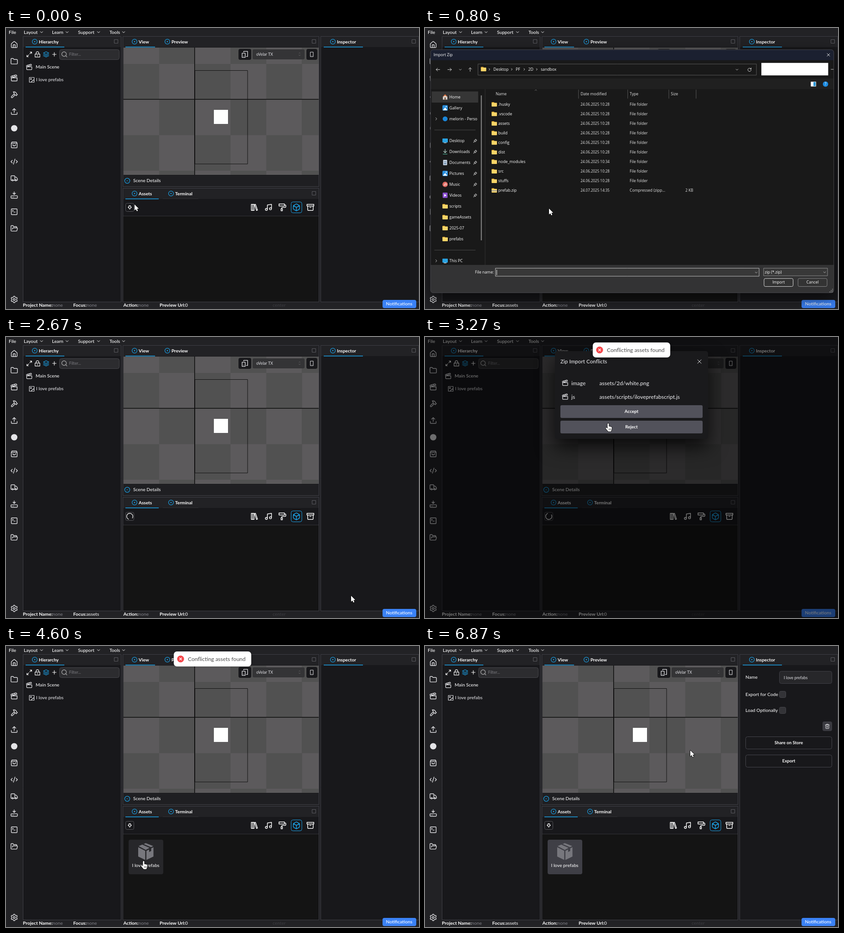
Write an HTML page with a canvas that moves like this. It is 906 px wide and 618 px high and loops after 7.34 s.

```html
<!DOCTYPE html>
<html lang="en">
<head>
<meta charset="utf-8">
<title>Zip import</title>
<style>
html, body { margin: 0; width: 100%; height: 100%; overflow: hidden; background: #18181b; }
canvas { display: block; }
</style>
</head>
<body>
<canvas id="stage" width="906" height="618"></canvas>
<script>
const c = document.getElementById('stage').getContext('2d');
const LOOP = 7340, UI = 'Lato, sans-serif', SYS = '"Open Sans", sans-serif';
const BLUE = '#1ba1e6', LIGHT = '#e4e4e7';
let t = 0;

// Outline icons on a 24 unit grid
const ICONS = {
  home: 'M15 21v-8a1 1 0 0 0-1-1h-4a1 1 0 0 0-1 1v8M3 10a2 2 0 0 1 .7-1.5l7-6a2 2 0 0 1 2.6 0l7 6A2 2 0 0 1 21 10v9a2 2 0 0 1-2 2H5a2 2 0 0 1-2-2z',
  folder: 'M20 20a2 2 0 0 0 2-2V8a2 2 0 0 0-2-2h-7.9a2 2 0 0 1-1.7-.9L9.6 3.9A2 2 0 0 0 7.9 3H4a2 2 0 0 0-2 2v13a2 2 0 0 0 2 2z',
  clapper: 'M20.2 6 3 11l-.9-2.4c-.3-1.1.3-2.2 1.3-2.5l13.5-4c1.1-.3 2.2.3 2.5 1.3zM6.2 5.3l3.1 3.9M12.4 3.4l3.1 4M3 11h18v8a2 2 0 0 1-2 2H5a2 2 0 0 1-2-2z',
  hammer: 'm15 12-8.4 8.4a1 1 0 0 1-3-3L12 9M18 15l4-4M21.5 11.5l-1.9-1.9A2 2 0 0 1 19 8.2V7l-2.3-2.3A6 6 0 0 0 12.5 3H9l.9.8A6.2 6.2 0 0 1 12 8.4V10l2 2h1.2a2 2 0 0 1 1.4.6l1.9 1.9',
  upload: 'M12 3v12M17 8l-5-5-5 5M21 15v4a2 2 0 0 1-2 2H5a2 2 0 0 1-2-2v-4',
  bag: 'M3 7h18M5 3h14l2 4v12a2 2 0 0 1-2 2H5a2 2 0 0 1-2-2V7zM16 11a4 4 0 0 1-8 0',
  code: 'm18 16 4-4-4-4M6 8l-4 4 4 4M14.5 4l-5 16',
  truck: 'M14 18V6a2 2 0 0 0-2-2H4a2 2 0 0 0-2 2v11a1 1 0 0 0 1 1h2M15 18H9M19 18h2a1 1 0 0 0 1-1v-4l-4-5h-4M9 18a2 2 0 1 1-4 0 2 2 0 1 1 4 0M19 18a2 2 0 1 1-4 0 2 2 0 1 1 4 0',
  drive: 'M12 2v8M16 6l-4 4-4-4M4 14h16a2 2 0 0 1 2 2v4a2 2 0 0 1-2 2H4a2 2 0 0 1-2-2v-4a2 2 0 0 1 2-2M6 18h.01M10 18h.01',
  terminal: 'M7 11l2-2-2-2M11 13h4M5 3h14a2 2 0 0 1 2 2v14a2 2 0 0 1-2 2H5a2 2 0 0 1-2-2V5a2 2 0 0 1 2-2z',
  open: 'M6 14l1.5-2.9A2 2 0 0 1 9.2 10H20a2 2 0 0 1 1.9 2.5l-1.5 6a2 2 0 0 1-2 1.5H4a2 2 0 0 1-2-2V5a2 2 0 0 1 2-2h3.9l2.5 3H18a2 2 0 0 1 2 2v2',
  books: 'M3 3h8v18H3zM7 3v18M12 4l3-1 6 17-3 1z',
  music: 'M9 18V5l12-2v13M9 18a3 3 0 1 1-6 0 3 3 0 1 1 6 0M21 16a3 3 0 1 1-6 0 3 3 0 1 1 6 0',
  roller: 'M2 2h16v6H2zM10 16v-2a2 2 0 0 1 2-2h8a2 2 0 0 0 2-2V7a2 2 0 0 0-2-2h-2M8 16h4v6H8z',
  box: 'M21 8a2 2 0 0 0-1-1.7l-7-4a2 2 0 0 0-2 0l-7 4A2 2 0 0 0 3 8v8a2 2 0 0 0 1 1.7l7 4a2 2 0 0 0 2 0l7-4A2 2 0 0 0 21 16zM3.3 7l8.7 5 8.7-5M12 22V12',
  archive: 'M2 3h20v5H2zM4 8v11a2 2 0 0 0 2 2h12a2 2 0 0 0 2-2V8M10 12h4',
  arrow: 'M15 5v6h4l-7 8-7-8h4V5z',
  expand: 'M15 3h6v6M9 21H3v-6M21 3l-7 7M3 21l7-7',
  lock: 'M3 11h18v11H3zM7 11V7a5 5 0 0 1 10 0v4M12 15v3',
  layers: 'M12 2 2 7l10 5 10-5zM2 12l10 5 10-5M2 17l10 5 10-5',
  plus: 'M5 12h14M12 5v14',
  search: 'M19 11a8 8 0 1 1-16 0 8 8 0 1 1 16 0M21 21l-4.3-4.3',
  image: 'M3 3h18v18H3zM11 9a2 2 0 1 1-4 0 2 2 0 1 1 4 0M21 15l-3-3-9 9',
  devices: 'M3 8h10v14H3zM8 18v.01M8 4V2h13v17h-4',
  phone: 'M6 2h12v20H6zM12 18v.01',
  trash: 'M3 6h18M19 6v14a2 2 0 0 1-2 2H7a2 2 0 0 1-2-2V6M8 6V3h8v3M10 11v6M14 11v6',
  down: 'm5 9 7 7 7-7', right: 'm9 5 7 7-7 7', up: 'm6 15 6-6 6 6', close: 'M4 4l16 16M20 4 4 20',
  left: 'M22 12H2M10 4l-8 8 8 8', refresh: 'M20 9a9 9 0 1 0 1 5M21 3v6h-6',
  download: 'M12 2v15M5 10l7 7 7-7',
  pin: 'M14 3l7 7-3 1-4 5-1 3-8-8 3-1 5-4zM8 16l-6 6'
};
for (const k in ICONS) ICONS[k] = new Path2D(ICONS[k]);
ICONS.gear = new Path2D('M15 12a3 3 0 1 1-6 0 3 3 0 1 1 6 0');
for (let i = 0; i <= 72; i++) {
  const a = i * Math.PI / 36, r = 8.8 + 1.3 * Math.tanh(2 * Math.cos(6 * a + Math.PI));
  ICONS.gear[i ? 'lineTo' : 'moveTo'](12 + r * Math.cos(a), 12 + r * Math.sin(a));
}

const clamp = v => Math.max(0, Math.min(1, v));
const span = (a, b) => clamp((t - a) / (b - a));
const between = (a, b) => t >= a && t < b;
const smooth = p => p * p * (3 - 2 * p);
const out = p => 1 - (1 - p) ** 3;

function rect(x, y, w, h, fill, stroke, r = 0) {
  c.beginPath();
  const o = stroke ? .5 : 0;
  c.roundRect(x + o, y + o, w - 2 * o, h - 2 * o, r);
  if (fill) { c.fillStyle = fill; c.fill(); }
  if (stroke) { c.strokeStyle = stroke; c.lineWidth = 1; c.stroke(); }
}
function disc(x, y, r, fill, stroke, w = 1.2) {
  c.beginPath();
  c.arc(x, y, r, 0, 7);
  if (fill) { c.fillStyle = fill; c.fill(); }
  if (stroke) { c.strokeStyle = stroke; c.lineWidth = w; c.stroke(); }
}
function poly(fill, ...p) {
  c.beginPath();
  for (let i = 0; i < p.length; i += 2) c.lineTo(p[i], p[i + 1]);
  c.closePath();
  c.fillStyle = fill;
  c.fill();
}
function text(s, x, y, color = '#f4f4f5', size = 10.2, weight = 500, align = 'left', font = UI) {
  c.font = `${weight} ${size}px ${font}`;
  c.textAlign = align;
  c.textBaseline = 'middle';
  c.fillStyle = color;
  c.fillText(s, x, y + .5);
}
const sys = (s, x, y, color = '#fff', size = 8.8, align) => text(s, x, y + .2, color, size, 500, align, SYS);
function icon(name, x, y, size = 16, color = LIGHT, w = 2, angle = 0) {
  c.save();
  c.translate(x, y);
  c.rotate(angle);
  c.scale(size / 24, size / 24);
  c.translate(-12, -12);
  c.strokeStyle = color;
  c.lineWidth = w;
  c.lineCap = c.lineJoin = 'round';
  c.stroke(ICONS[name]);
  c.restore();
}
function scaled(x, y, s, alpha, draw) {
  c.save();
  c.globalAlpha = alpha;
  c.translate(x, y);
  c.scale(s, s);
  c.translate(-x, -y);
  draw();
  c.restore();
}

function tab(label, x, y, from, to) {
  disc(x, y, 5.4, null, BLUE);
  disc(x, y, 1.3, BLUE);
  text(label, x + 9, y, '#fff', 10, 700);
  if (to) rect(from, y + 11, to - from, 1.5, BLUE);
}
function panel(x, y, w, h) {
  rect(x, y, w, h, '#18181b', '#3f3f46');
  rect(x + 1, y + 1, w - 2, 23, '#222225');
  rect(x + w - 16, y + 7, 9, 9, null, '#5b5b60');
}

function drawView() {
  c.save();
  c.beginPath();
  c.rect(257, 43, 429, 280);
  c.clip();
  for (let i = 0; i < 6; i++) for (let j = -2; j < 3; j++)
    rect(257.7 + i * 78.3, 157.3 + j * 78.4, 78.8, 78.8, (i + j) % 2 ? '#515151' : '#5c5a5c');
  rect(413, 43, 1.5, 280, '#0c0c0c');
  rect(256, 156, 431, 1.5, '#0c0c0c');
  rect(414, 93, 116.5, 206.5, null, '#111');
  rect(456, 180, 31, 31, '#fff');
  c.restore();
  rect(510, 46, 28, 24, '#18181b', null, 4);
  icon('devices', 524, 58, 16);
  rect(541, 47, 114, 22, '#343436', null, 3);
  text('oVelar TX', 549, 57.5, '#d4d4d8', 8.7);
  icon('up', 644, 55, 6, '#888');
  icon('down', 644, 60, 6, '#888');
  rect(659, 46, 24, 24, '#18181b', null, 4);
  icon('phone', 671, 58, 12);
}

function drawCard() {
  rect(269, 426, 76, 76, t >= 4670 ? '#3f3f46' : '#27272a', null, 4);
  const g = '#77777d';
  poly(g, 291, 440, 299, 436.7, 315, 444, 306.5, 448.5);
  poly(g, 302, 435.4, 306.5, 433.5, 323, 440, 318, 442.5);
  poly(g, 290, 442.5, 305.5, 450.5, 305.5, 470.5, 290, 463);
  poly(g, 308, 450.5, 314, 447.4, 314, 453, 318.5, 450.8, 318.5, 445, 323.5, 442.5, 323.5, 463, 308, 470.5);
  text('I love prefabs', 306.5, 482, '#f4f4f5', 10.2, 500, 'center');
}

function drawInspector() {
  text('Name', 703, 68.5);
  rect(777, 55, 116, 28, '#27272a', '#3f3f46', 4);
  text('I love prefabs', 787, 69.5, '#d4d4d8', 8.9);
  [['Export for Code', 106], ['Load Optionally', 141]].forEach(([label, y]) => {
    text(label, 703, y);
    rect(777, y - 7, 15, 15, '#333337', '#46464b', 3);
  });
  rect(872, 166, 21, 21, between(5560, 5760) ? '#52525b' : '#3a3a40', null, 4);
  icon('trash', 882.5, 176.5, 12);
  [['Share on Store', 199], ['Export', 239]].forEach(([label, y]) => {
    const hover = y === 199 && between(5820, 6020);
    rect(703, y, 190, 28, hover ? '#27272a' : null, '#46464d', 4);
    text(label, 798, y + 14, '#fff', 9.6, 700, 'center');
  });
}

function drawApp() {
  rect(0, 0, 906, 618, '#222225');
  text('File', 6, 9, '#fff');
  [['Layout', 39, 78], ['Learn', 101, 134], ['Support', 158, 203], ['Tools', 227, 258]].forEach(([s, x, cx]) => {
    text(s, x, 9, '#fff');
    icon('down', cx, 9, 9, '#fff', 2.6);
  });
  ['home', 'folder', 'clapper', 'hammer', 'upload', '', 'bag', 'code', 'truck', 'drive', 'terminal', 'open'].forEach((k, i) => {
    const y = 36.7 + i * 36.75;
    if (k) icon(k, 18, y, 17); else disc(18, y, 7, LIGHT);
  });
  icon('gear', 18, 597, 17);

  panel(37, 18, 216, 585);
  tab('Hierarchy', 63, 30, 43, 128);
  icon('expand', 51, 58, 14, '#fff');
  icon('lock', 69, 58, 14, '#fff');
  icon('layers', 88, 58, 14, BLUE);
  icon('plus', 106, 58, 14, '#fff');
  rect(117, 47, 132, 23, '#2c2c2f', '#47474c', 4);
  icon('search', 128, 58, 15, '#bbb', 1.8);
  text('Filter...', 138.5, 57.5, '#77777c', 8.7);
  icon('clapper', 51, 86, 15);
  text('Main Scene', 65, 85);
  icon('image', 56.5, 114, 14);
  text('I love prefabs', 66, 113.5, '#dcdce0');

  panel(256, 18, 431, 331);
  tab('View', 282, 30, 262, 327);
  tab('Preview', 354, 30);
  drawView();
  rect(257, 324, 429, 24, '#1f1f22');
  disc(266, 336, 5.6, null, BLUE);
  icon('up', 266, 336, 7, BLUE, 3);
  text('Scene Details', 279, 335.5);

  panel(256, 352, 431, 251);
  tab('Assets', 282, 364, 262, 335);
  tab('Terminal', 362, 364);
  rect(344, 375, 78, 1, '#303034');
  rect(257, 414, 429, 188, '#141414');
  rect(257, 413, 429, 1, '#333337');
  rect(262, 385, 19, 19, '#18181b', between(130, 270) ? '#8a8a90' : '#55555a', 3);
  if (between(270, 4000)) {
    const a = (108 + (t - 2670) * .36) * Math.PI / 180;
    c.beginPath();
    c.arc(271.5, 394.5, 6.8, a, a + 5.03);
    c.strokeStyle = '#eee';
    c.lineWidth = 1.4;
    c.stroke();
  } else icon('arrow', 271.5, 394.5, 13, '#fff', 2.2);
  rect(625, 382, 24.5, 25, null, BLUE, 4);
  ['books', 'music', 'roller', 'box', 'archive'].forEach((k, i) =>
    icon(k, 545 + i * 30.7, 394.5, 18, k === 'box' ? BLUE : '#fff'));
  if (t >= 4000) drawCard();

  panel(690, 18, 216, 585);
  tab('Inspector', 717, 30, 697, 783);
  if (t >= 4740) drawInspector();

  const focus = between(270, 2730) || t >= 4670;
  [['Project Name:', 37, 'none'], ['Focus:', 147.5, focus ? 'assets' : 'none'],
    ['Action:', 257.5, 'none'], ['Preview Url:', 337, '0']].forEach(([k, x, v]) => {
    text(k, x, 609.5, '#fff', 10.3, 700);
    text(v, x + c.measureText(k).width, 609.5, v === 'none' ? '#7a7a80' : '#f4f4f5');
  });
  text('center', 585, 609.5, '#3a3a3e');
  rect(826, 598, 74, 18, '#3b82f6', null, 4);
  text('Notifications', 862.5, 606.5, '#fff', 10.2, 500, 'center');
}

function yellowFolder(x, y, zip) {
  rect(x - 6, y - 5, 6, 4, '#d9a12b', null, 1);
  rect(x - 6, y - 3.5, 12, 8.5, '#f9d567', null, 1);
  if (zip) rect(x - 6, y, 12, 2, '#9a9a9a');
}
function navIcon(kind, x, y) {
  if (kind === 'dir') yellowFolder(x, y);
  else if (kind === 'house') {
    poly('#d9d4cf', x - 5, y, x, y - 5, x + 5, y, x + 5, y + 6, x - 5, y + 6);
    poly('#e8743b', x - 6, y, x, y - 6, x + 6, y, x, y - 3);
    rect(x - 1.5, y + 1, 3, 5, '#7d5a44');
  } else if (kind === 'cloud') disc(x, y, 5.5, '#1a86d9');
  else if (kind === 'screen') {
    rect(x - 6, y - 5, 12, 9, '#29a3e2', null, 1);
    rect(x - 3, y + 4, 6, 1.5, '#b7c3cc');
  } else if (kind === 'load') {
    icon('download', x, y, 12, '#b8d8cf', 2.4);
    rect(x - 5, y + 5, 10, 1.2, '#4fb89b');
  } else if (kind === 'doc') {
    rect(x - 4.5, y - 6, 9, 12, '#c9d6e4', null, 1);
    rect(x - 2.5, y - 3, 5, 1.2, '#51708f');
    rect(x - 2.5, y, 5, 4, '#7c98b5');
  } else if (kind === 'pic') {
    rect(x - 6, y - 6, 12, 12, '#2a8fdd', null, 2);
    poly('#fff', x - 5, y + 5, x, y - 1, x + 5, y + 5);
    disc(x + 2.5, y - 3, 1.2, '#fff');
  } else if (kind === 'song') {
    disc(x, y, 6, '#e0685f');
    icon('music', x, y, 7, '#fff', 2.6);
  } else {
    rect(x - 5.5, y - 6, 11, 12, '#8a4fd0', null, 1.5);
    poly('#fff', x - 2, y - 3, x + 3, y, x - 2, y + 3);
  }
}

function drawDialog() {
  const ready = t >= 870, picked = t >= 1330, hover = between(1200, 1330);
  c.shadowColor = 'rgba(0,0,0,.6)';
  c.shadowBlur = 36;
  c.shadowOffsetY = 12;
  rect(3, 42, 903, 546, '#191919', null, 6);
  c.shadowColor = 'transparent';
  rect(3, 42, 903, 24, '#1b2030', null, [6, 6, 0, 0]);
  rect(3, 107, 903, 24, '#202020');
  rect(3, 525, 903, 63, '#333334', null, [0, 0, 6, 6]);
  rect(3, 42, 903, 546, null, '#45454a', 6);
  sys('Import Zip', 10, 54);
  icon('close', 893.5, 54, 9, '#fff', 2.4);

  [[20, 0], [46, Math.PI], [92, Math.PI / 2]].forEach(([x, a]) => icon('left', x, 87, 10, '#ddd', 2.4, a));
  icon('down', 70, 87, 8, '#ddd', 2.6);
  rect(109, 74, 624, 26, '#191919', '#5a5a5a');
  yellowFolder(122, 86);
  [['Desktop', 144], ['PF', 194], ['2D', 222], ['sandbox', 250]].forEach(([s, x]) => {
    icon('right', x - 9, 86.5, 7, '#fff', 3);
    sys(s, x, 86.5);
  });
  if (t >= 1130) icon('right', 292, 86.5, 7, '#fff', 3);
  icon('down', 689, 87, 8, '#ddd', 2.6);
  icon('refresh', 717, 87, 10, '#ddd', 2.4);
  if (ready) {
    rect(741, 74, 155, 26, '#191919', '#5a5a5a');
    sys('Search sandbox', 748, 86.5, '#8f8f8f');
    icon('search', 881, 87, 9, '#aaa', 2.4, Math.PI / 2);
    sys('Organize', 17, 119);
    poly('#ddd', 57, 118, 64, 118, 60.5, 122);
    sys('New folder', 87, 119);
    rect(812, 114, 12, 11, null, '#ddd');
    for (let y = 116; y < 124; y += 3) rect(814, y, 8, 1, '#ddd');
    poly('#ddd', 831, 118, 838, 118, 834.5, 122);
  } else {
    rect(743.5, 72, 149.5, 28, '#fff');
    rect(899, 86, 6, 1, '#ccc');
  }
  rect(854, 114, 12, 11, '#fff', '#ddd');
  rect(860, 115, 5, 9, '#2b97d8');
  disc(887, 119.5, 6, '#1c8be0');
  sys('?', 887, 119, '#fff', 8.8, 'center');

  rect(6, 136, 104, 25, '#363636');
  const nav = [['house', 'Home'], ['pic', 'Gallery'], ['cloud', 'melorin - Perso'], 0, ['screen', 'Desktop'],
    ['load', 'Downloads'], ['doc', 'Documents'], ['pic', 'Pictures'], ['song', 'Music'], ['film', 'Videos'],
    ['dir', 'scripts'], ['dir', 'gameAssets'], ['dir', '2025-07'], ['dir', 'prefabs'], 0, ['screen', 'This PC']];
  nav.forEach((item, i) => {
    const y = 148.5 + i * 24.5;
    if (!item) return rect(12, y, 92, 1, '#484848');
    navIcon(item[0], 36, y);
    sys(item[1], 45.5, y);
    if (i > 3 && i < 10) icon('pin', 103.5, y, 9, '#a8a8a8', 3.6);
    if (i === 2 || i === 15) icon('right', 16, y, 9, '#ddd', 2.4);
  });
  rect(116, 145, 2, 325, '#8d8d8d');
  rect(125, 131, 1, 394, '#333');

  icon('up', 239, 133, 8, '#aaa', 2);
  [['Name', 149, 334], ['Date modified', 339, 444], ['Type', 449, 536], ['Size', 541, 597]].forEach(([s, x, edge]) => {
    sys(s, x, 141.5, '#e6e6e6');
    rect(edge, 132, 1, 20, '#5a5a5a');
  });
  if (picked || hover) rect(137, 348, 458, 19, picked ? '#4f4f4f' : '#383838', picked ? '#9a9a9a' : null);
  ['.husky', '.vscode', 'assets', 'build', 'config', 'dist', 'node_modules', 'src', 'stuffs', 'prefab.zip'].forEach((s, i) => {
    const y = 165.2 + i * 21.45, zip = i === 9;
    yellowFolder(146, y - .3, zip);
    sys(s, 155, y);
    sys(zip ? '24.07.2025 14:35' : `24.06.2025 10:${i === 6 ? 34 : 28}`, 339, y, '#e6e6e6', 8.2);
    sys(zip ? 'Compressed (zipp...' : 'File folder', 449, y, '#e6e6e6', 8.7);
    if (zip) sys('2 KB', 591, y, '#e6e6e6', 8.4, 'right');
  });

  sys('File name:', 145, 541.5, '#fff', 8.8, 'right');
  rect(148, 532, 591, 19, '#383838', picked ? '#8f8f8f' : '#c4c4c4');
  if (picked) sys('prefab.zip', 151.5, 542);
  else if (t < 1100) rect(151, 536, 1, 12, '#fff');
  icon('down', 732, 542, 8, '#ddd', 2.4);
  rect(748, 532, 144, 18, '#383838', '#8f8f8f');
  sys('zip (*.zip)', 751, 541.5);
  icon('down', 885, 541.5, 8, '#ddd', 2.4);
  rect(749, 555, 66, 19, t >= 2000 ? '#393939' : '#333', '#e0e0e0', 3);
  sys('Import', 782, 564, '#fff', 8.8, 'center');
  rect(825, 555, 66, 19, '#333', '#8a8a8a', 3);
  sys('Cancel', 858, 564, '#fff', 8.8, 'center');
  for (let i = 0; i < 3; i++) for (let j = 0; j <= i; j++) rect(902 - j * 3, 579 + i * 3, 1.5, 1.5, '#aaa');
}

function drawModal() {
  c.shadowColor = 'rgba(0,0,0,.75)';
  c.shadowBlur = 40;
  c.shadowOffsetY = 18;
  rect(285, 31, 336, 193, '#1a1a1c', null, 5);
  c.shadowColor = 'transparent';
  text('Zip Import Conflicts', 297, 54, LIGHT, 11.7);
  icon('close', 602, 54, 12, LIGHT, 2);
  [['image', 'assets/2d/white.png', 101.5], ['js', 'assets/scripts/iloveprefabscript.js', 132]].forEach(([kind, path, y]) => {
    icon('clapper', 307.5, y - .5, 15);
    text(kind, 321, y, LIGHT, 12);
    text(path, 382.5, y, LIGHT, 12);
  });
  [['Accept', 150], ['Reject', 184]].forEach(([s, y]) => {
    rect(297, y, 312, 28, '#52525b', null, 3);
    text(s, 453, y + 14, '#fff', 9.8, 700, 'center');
  });
}

function drawToast() {
  const enter = out(span(2730, 3060)), leave = out(span(6720, 6900));
  c.save();
  c.translate(0, -66 * (1 - enter) - 55 * leave);
  scaled(453, 28.5, 1 - .4 * (1 - enter) - .4 * leave, (.5 + .5 * enter) * (1 - leave), () => {
    c.shadowColor = 'rgba(0,0,0,.15)';
    c.shadowBlur = 8;
    rect(368, 12, 170, 33, '#fff', null, 7);
    c.shadowColor = 'transparent';
    scaled(383, 28.5, out(span(2830, 3130)), 1, () => {
      disc(383, 28.5, 7.6, '#f5474b');
      icon('close', 383, 28.5, 7, '#fff', 5);
    });
    text('Conflicting assets found', 399, 28.5, '#4a4a4a', 12, 400);
  });
  c.restore();
}

// Pointer stops: time, x, y, hand shape from this time on
const PATH = [
  [0, 282, 388, 0], [70, 282, 388, 0], [130, 272, 397, 1], [270, 272, 397, 0], [1070, 272, 397, 0],
  [1330, 240, 357, 0], [1470, 240, 357, 0], [2100, 757, 569, 0], [2700, 757, 569, 0], [3200, 402, 190, 1],
  [3400, 402, 190, 1], [3560, 416, 165, 1], [3680, 416, 165, 0], [3870, 416, 165, 0], [4330, 298, 490, 1],
  [4540, 302, 473, 1], [4740, 302, 473, 0], [5400, 850, 130, 0], [5640, 874, 173, 1], [5780, 850, 195, 0],
  [5900, 800, 212, 1], [6020, 720, 219, 0], [6200, 601, 221, 0], [6330, 582, 229.5, 0], [LOOP, 582, 229.5, 0]];
function drawPointer() {
  const i = PATH.findIndex(p => p[0] > t), [a, x, y, hand] = PATH[i - 1], [b, x2, y2] = PATH[i];
  const p = smooth(span(a, b));
  c.save();
  c.translate(x + (x2 - x) * p, y + (y2 - y) * p);
  const shape = new Path2D(hand
    ? 'M-1.6 1.2a1.5 1.5 0 0 1 3 0V6.5l5 1q1.7.5 1.6 2.5l-.6 4-1.4 3.8h-6L-4.5 12.5q-2-2.8-.4-3.2 1.4-.2 3.3 1.9z'
    : 'M0 0V13.2L3 10.4 5 15 7.3 14 5.3 9.6H9.4z');
  c.lineWidth = 1.6;
  c.lineJoin = 'round';
  c.strokeStyle = '#000';
  c.stroke(shape);
  c.fillStyle = '#fff';
  c.fill(shape);
  if (hand) for (let k = 0; k < 3; k++) rect(1 + k * 2, 11, .8, 4, '#444');
  c.restore();
}

function frame(now) {
  t = now % LOOP;
  drawApp();
  if (between(640, 2500)) {
    const open = span(640, 1000), close = span(2300, 2500);
    scaled(454.5, 315, 1 - .115 * (1 - open) ** 3 - .08 * close, Math.min(1, open * 4) * (1 - close), drawDialog);
  }
  if (between(2730, 3780)) {
    const shown = out(span(2730, 2930)) * (1 - span(3620, 3780));
    rect(0, 0, 906, 618, `rgba(0,0,0,${.52 * shown})`);
    scaled(453, 127, .95 + .05 * shown, shown, drawModal);
  }
  if (between(2730, 6900)) drawToast();
  drawPointer();
  requestAnimationFrame(frame);
}
requestAnimationFrame(frame);
</script>
</body>
</html>
```
